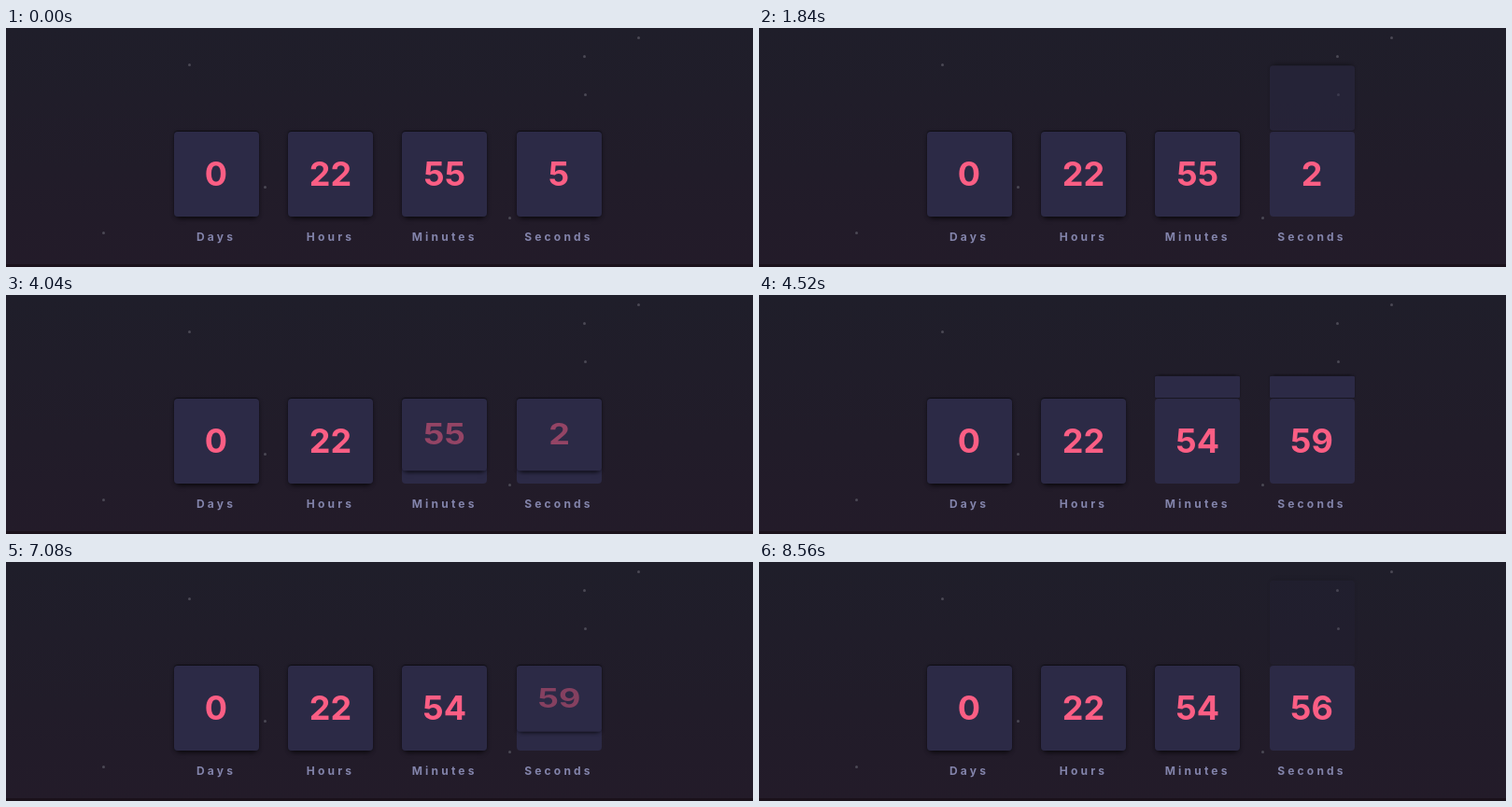
An HTML page that plays this animation: 800 px wide and 256 px high, repeating every 9.08 s.

```html
<!DOCTYPE html>
<html lang="en">
<head>
<meta charset="utf-8">
<title>Countdown</title>
<style>
  html, body { margin: 0; width: 100%; height: 100%; overflow: hidden; background: #211c29; }
  #stage {
    position: relative; width: 800px; height: 256px; overflow: hidden;
    background: linear-gradient(#1f1e2a, #211c29 60%, #231b29);
    font-family: Inter, "Open Sans", sans-serif; font-weight: 700; text-align: center;
  }
  #stage::after {
    content: ""; position: absolute; left: 0; right: 0; bottom: 0; height: 3px; background: #1a111b;
  }
  .star {
    position: absolute; width: 3px; height: 3px; margin: -1.5px; border-radius: 50%; background: #4b4955;
  }
  .unit { position: absolute; top: 111px; width: 91px; }
  .card {
    position: absolute; top: 0; left: 0; width: 91px; height: 91px; border-radius: 4px;
    background: #2c2a46; color: #fb5e84; font-size: 36px; line-height: 91px;
  }
  .flap {
    transform-origin: 50% -0.5px;
    box-shadow: 0 -1px 1px rgba(0,0,0,.5), 0 1px 4px rgba(0,0,0,.4), 0 6px 5px -4px rgba(0,0,0,.55);
  }
  .label {
    position: absolute; top: 105px; left: -20px; width: 131px;
    font-size: 12px; line-height: 15px; letter-spacing: 3.2px; color: #8384ab;
  }
</style>
</head>
<body>
<div id="stage"></div>
<script>
const LOOP = 9080, FLIP = 2500, GONE = 0.72;
const stage = document.getElementById("stage");

const STARS = [[196, 39], [619.5, 30], [677, 10], [620.5, 71.5], [277, 170.5], [539.5, 203], [104.5, 219]];

// Each flip: start time, value shown afterwards, opacity the flap keeps until the loop ends.
const UNITS = [
  { name: "Days", x: 179.5, first: 0, flips: [] },
  { name: "Hours", x: 302, first: 22, flips: [] },
  { name: "Minutes", x: 424.2, first: 55, flips: [[3677, 54, 0]] },
  { name: "Seconds", x: 546.5, first: 5, flips: [[649, 2, 0], [3677, 59, 0], [6670, 56, 0.14]] }
];

function add(parent, cls, text = "") {
  const el = document.createElement("div");
  el.className = cls;
  el.textContent = text;
  parent.append(el);
  return el;
}

const clamp = v => Math.min(1, Math.max(0, v));

// The CSS "ease" curve, solved by bisection.
function ease(x) {
  x = clamp(x);
  let lo = 0, hi = 1;
  for (let i = 0; i < 24; i++) {
    const s = (lo + hi) / 2;
    if (0.75 * s * (1 - s) + s ** 3 < x) lo = s; else hi = s;
  }
  return 0.3 * lo * (1 - lo) ** 2 + 3 * lo * lo * (1 - lo) + lo ** 3;
}

for (const [x, y] of STARS) {
  const star = add(stage, "star");
  star.style.left = x + "px";
  star.style.top = y + "px";
}

for (const unit of UNITS) {
  const box = add(stage, "unit");
  box.style.left = unit.x + "px";
  unit.base = add(box, "card", unit.first);
  unit.flap = add(box, "card flap", unit.first);
  add(box, "label", unit.name);
}

function drawUnit(unit, t) {
  let old = unit.first, now = old, p = 1, keep = 0;
  for (const [start, value, rest] of unit.flips) {
    if (t < start) break;
    old = now;
    now = value;
    keep = rest;
    p = (t - start) / FLIP;
  }
  const { base, flap } = unit;
  const turning = p < GONE || keep > 0;
  const scale = turning ? Math.cos(Math.PI * ease(p)) : 1;
  const ink = !turning ? 1 : scale > 0 ? 1 - ease(p * 2) : 0;
  const fade = (1 - clamp((p - 0.34) / 0.36)) ** 1.5;

  base.textContent = now;
  flap.textContent = turning ? old : now;
  flap.style.transform = `scaleY(${scale.toFixed(4)})`;
  flap.style.color = `rgba(251,94,132,${ink.toFixed(3)})`;
  flap.style.opacity = turning ? Math.max(keep, fade) : 1;
}

const begin = performance.now();
function draw() {
  const t = Math.max(0, performance.now() - begin) % LOOP;
  for (const unit of UNITS) drawUnit(unit, t);
  requestAnimationFrame(draw);
}
draw();
</script>
</body>
</html>
```
